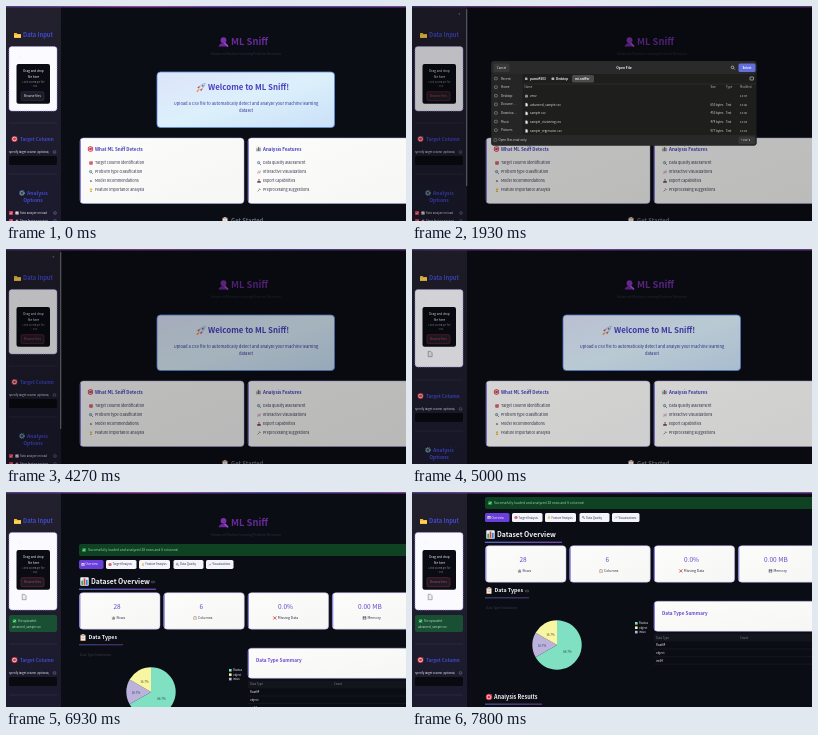
Write an HTML page that moves like this. It is 400 px wide and 215 px high and loops after 8000 ms.

```html
<!DOCTYPE html>
<html lang="en">
<head>
<meta charset="utf-8">
<title>ML Sniff</title>
<style>
  html, body { margin: 0; width: 100%; height: 100%; overflow: hidden; background: #0b0d14; }
  svg { display: block; width: 400px; height: 215px; }
  text { font-family: "Noto Sans CJK SC", "Noto Sans CJK JP", "Noto Sans", sans-serif; white-space: pre; }
</style>
</head>
<body>
<svg id="stage" viewBox="0 0 400 215"></svg>
<script>
const LOOP = 8000, STEP = 1000 / 15;
const BLUE = '#4149cc', VIOLET = '#6848cf', WHITE = '#f3f3f8', INK = '#30304a';

// --- drawing helpers (y of a text is its middle) ---
const rect = (x, y, w, h, fill, r = 0, extra = '') =>
  `<rect x="${x}" y="${y}" width="${w}" height="${h}" rx="${r}" fill="${fill}" ${extra}/>`;
const text = (x, y, size, str, fill = WHITE, weight = 400, anchor = 'start') =>
  `<text x="${x}" y="${y + size * 0.36}" font-size="${size}" fill="${fill}" font-weight="${weight}" text-anchor="${anchor}">${str}</text>`;
const mid = (x, y, size, str, fill, weight) => text(x, y, size, str, fill, weight, 'middle');
const line = (x1, y1, x2, y2, stroke, w = 0.5) =>
  `<path d="M${x1} ${y1}L${x2} ${y2}" stroke="${stroke}" stroke-width="${w}"/>`;
const group = (id, body) => `<g id="${id}">${body}</g>`;
const path = (d, stroke, w = 1.2, fill = 'none') =>
  `<path d="${d}" stroke="${stroke}" stroke-width="${w}" fill="${fill}"/>`;
const disc = (r, fill, x = 5, y = 5) => `<circle cx="${x}" cy="${y}" r="${r}" fill="${fill}"/>`;

// Icons live in a 10 by 10 box
const icons = {
  target: disc(5, '#d92f3c') + disc(3.6, '#f5e6e8') + disc(2.4, '#d92f3c') + path('M5 5L9 1', '#4a7fd0'),
  folder: path('M0 2h4l1 1.5h5V9H0z', 'none', 0, '#f2b92c') + rect(0, 4.5, 10, 4.5, '#ffd257', 0.8),
  chart: rect(0, 0, 10, 10, '#e9edf2', 1) + rect(1.3, 4, 2, 5, '#39a757') + rect(4, 1.5, 2, 7.5, '#d64545') + rect(6.7, 3, 2, 6, '#3e7fd1'),
  trend: rect(0, 0, 10, 10, '#e9edf2', 1) + path('M1 8L4 5L6 6.5L9 2', '#d63b48', 1.4),
  clip: rect(1, 1, 8, 9, '#b9794a', 1) + rect(2, 2.4, 6, 6.8, '#f2f2f2') + rect(3, 0, 4, 2.4, '#a9b3bd', 0.6) + path('M3 4.5h4M3 6.5h4', '#8892a0', 0.7),
  lens: path('M6 6L9.5 9.5', '#3a4656', 1.8) + '<circle cx="4" cy="4" r="3" fill="#a9d4ee" stroke="#4b5b70" stroke-width="1.3"/>',
  check: rect(0, 0, 10, 10, '#27a845', 1.5) + path('M2 5.2L4.3 7.6L8.3 2.5', '#fff', 1.6),
  cross: path('M1 1L9 9M9 1L1 9', '#d9303f', 2.2),
  disk: rect(0.5, 0.5, 9, 9, '#3d4858', 1) + rect(2.5, 0.5, 5, 3.5, '#c9d0d8') + rect(2, 5.5, 6, 4, '#e6e9ee'),
  gear: '<circle cx="5" cy="5" r="4" fill="none" stroke="#6f9fb4" stroke-width="2" stroke-dasharray="1.6 1"/><circle cx="5" cy="5" r="2.6" fill="none" stroke="#6f9fb4" stroke-width="1.5"/>',
  rocket: path('M9.5 .5Q5 .8 2.5 6L4 7.5Q9.2 5 9.5 .5z', '#8590a0', 0.5, '#dfe5ec') + path('M4 3L1 5l1.6.8zM7 6L5 9l-.8-1.6z', 'none', 0, '#d7384a') + disc(1, '#4480ca', 6.8, 3.2) + path('M2.6 7.4L.6 9.4', '#f39c2c', 1.6),
  person: disc(2.9, '#7b2fa8', 5, 3.2) + path('M0 9.5Q1 6 5 6T10 9.5z', 'none', 0, '#6b2697') + path('M6 6L9.5 9.5', '#a64fd0', 1.3),
  star: path('M2 1h6v3Q8 6.5 5 6.5T2 4z', 'none', 0, '#f0c03a') + rect(4.3, 6, 1.4, 2.5, '#d9a021') + rect(2.8, 8.3, 4.4, 1.5, '#b37b1f'),
  tray: rect(0.5, 5, 9, 4.5, '#4c5562', 1) + path('M5 7V1M2.6 3L5 .8L7.4 3', '#d43d4b', 1.6),
  tool: path('M1.5 8.5L7 3', '#8d5c34', 1.8) + path('M5.5 1L9 4.5', '#7d8896', 2.2),
  dot: path('M5 2L6 4.4L8.5 5L6 6L5 8.4L4 6L1.5 5L4 4z', 'none', 0, '#46506a'),
  file: path('M2 .5h4L8.5 3v6.5H2z', '#707080', 0.9, '#ececf2'),
  link: path('M4.5 3H2.5a2 2 0 000 4h2M5.5 3h2a2 2 0 010 4h-2M3.5 5h3', '#8a8c98', 1),
};
const icon = (name, x, y, s) =>
  `<g transform="translate(${x - s / 2} ${y - s / 2}) scale(${s / 10})">${icons[name]}</g>`;
const help = (x, y) => `<circle cx="${x}" cy="${y}" r="1.4" fill="none" stroke="#9a9aac" stroke-width=".4"/>` + mid(x, y, 2, '?', '#9a9aac');

const card = (x, y, w, h) =>
  rect(x, y, w, h, 'url(#paper)', 3.5, 'stroke="#b4abee" stroke-width=".5"') +
  rect(x, y + 2, 0.9, h - 4, '#7d72e2', 0.4);

// --- sidebar ---
function sidebar() {
  const drop = rect(3, 40.5, 48, 64.5, '#fafaff', 3, 'id="drop" stroke="#a99fec" stroke-width=".8" stroke-dasharray="1.2 .9"') +
    text(13, 50, 2.4, '▯', '#d5d5de') +
    rect(10.5, 58, 33.5, 39.8, '#0b0c13', 2) +
    mid(27.5, 65, 3.1, 'Drag and drop', WHITE, 500) + mid(27.5, 71, 3.1, 'file here', WHITE, 500) +
    mid(27.5, 76, 2.4, 'Limit 200MB per file', '#8e8f9b') + mid(27.5, 80, 2.4, '• CSV', '#8e8f9b') +
    rect(15, 85.7, 23, 9, '#1b1c28', 1.5, 'id="browse" stroke="#42434f" stroke-width=".4"') +
    group('browseText', mid(26.5, 90.2, 3, 'Browse files', 'currentColor', 500)) +
    group('chip', icon('file', 18, 105, 6));
  const uploaded = rect(3, 123, 48, 17, '#194f33', 2) + icon('check', 8.5, 129, 3.6) +
    text(12, 129, 2.8, 'File uploaded:', '#b9efc9') + text(6, 134.5, 2.8, 'advanced_sample.csv', '#b9efc9');
  const option = (y, name, str) => rect(3, y - 2, 4, 4, '#e23b52', 0.8) + path(`M4 ${y}l.8 .9l1.4 -1.8`, '#fff', 0.5) +
    icon(name, 11, y, 3.2) + text(14, y, 2.8, str) + help(49, y);
  const lower = line(3, 117, 51, 117, '#34344a') +
    icon('target', 8.5, 133, 6) + text(14, 133, 4.7, 'Target Column', BLUE, 700) +
    text(3, 146, 2.7, 'Specify target column (optional)') + help(48.5, 146) +
    rect(3, 150, 48, 9, '#080a10', 1.5) + line(3, 168, 51, 168, '#34344a') +
    icon('gear', 16, 187, 5.6) + text(21, 187, 5.1, 'Analysis', BLUE, 700) + mid(27, 194, 5.1, 'Options', BLUE, 700) +
    option(207, 'trend', 'Auto analyze on load') + option(215, 'target', 'Show feature analysis');
  return rect(0, 0, 55, 215, 'url(#side)') +
    group('hovered', mid(47.5, 7.5, 4, '«', '#c0c0cc') + rect(54, 3, 1.3, 177, '#6b6b76', 0.6)) +
    icon('folder', 11.5, 29, 7) + text(17, 29, 5.8, 'Data Input', BLUE, 700) +
    drop + group('uploaded', uploaded) + group('lower', lower);
}

const header = y => icon('person', 217.5, y, 10) + text(225, y, 9.4, 'ML Sniff', '#672b99', 700) +
  mid(240, y + 12, 3.2, 'Advanced Machine Learning Problem Detection', '#2f313d');

function welcome() {
  const features = (x, name, title, items) => card(x, 132, 164, 65.5) +
    icon(name, x + 10.5, 143, 5.4) + text(x + 15, 143, 4.5, title, '#4540b8', 700) +
    items.map(([n, s], i) => icon(n, x + 11, 157 + i * 9, 4) + text(x + 15, 157 + i * 9, 3.75, s, INK)).join('');
  return header(36) +
    rect(151, 66, 177.5, 55.5, 'url(#sky)', 3.5, 'stroke="#5f8ee8" stroke-width=".8"') +
    icon('rocket', 195, 81.5, 9.5) + text(202, 81.5, 7.9, 'Welcome to ML Sniff!', '#493fc0', 700) +
    mid(240, 97.5, 4.1, 'Upload a CSV file to automatically detect and analyze your machine learning', '#34309a', 500) +
    mid(240, 104.5, 4.1, 'dataset', '#34309a', 500) +
    features(74, 'target', 'What ML Sniff Detects', [['target', 'Target column identification'], ['lens', 'Problem type classification'],
      ['dot', 'Model recommendations'], ['star', 'Feature importance analysis']]) +
    features(242, 'chart', 'Analysis Features', [['lens', 'Data quality assessment'], ['trend', 'Interactive visualizations'],
      ['tray', 'Export capabilities'], ['tool', 'Preprocessing suggestions']]) +
    icon('clip', 219, 214.5, 7) + text(225, 214.5, 5.8, 'Get Started', '#6c6e7a', 700);
}

// --- results page ---
function slice(from, to, fill) {
  const r = 24.7, p = a => `${145 + r * Math.sin(a * 2 * Math.PI)} ${206 - r * Math.cos(a * 2 * Math.PI)}`;
  return `<path d="M145 206L${p(from)}A${r} ${r} 0 ${to - from > 0.5 ? 1 : 0} 1 ${p(to)}z" fill="${fill}"/>`;
}
function results() {
  const tabs = [[73, 24.5, 'chart', 'Overview'], [100, 30.5, 'target', 'Target Analysis'], [133, 31, 'star', 'Feature Analysis'],
    [167.5, 30, 'lens', 'Data Quality'], [200, 27.5, 'trend', 'Visualizations']];
  const stats = [['28', 'chart', 'Rows'], ['6', 'clip', 'Columns'], ['0.0%', 'cross', 'Missing Data'], ['0.00 MB', 'disk', 'Memory']];
  const kinds = [['float64', '#80e0c2'], ['object', '#f8f6a2'], ['int64', '#bbb3dc']];
  const chart = text(74, 169, 3, 'Data Type Distribution', '#3b3d48') +
    slice(0, 2 / 3, kinds[0][1]) + slice(2 / 3, 5 / 6, kinds[2][1]) + slice(5 / 6, 1, kinds[1][1]) +
    mid(155.5, 212.5, 3, '66.7%', '#26443c') + mid(130, 206.5, 3, '16.7%', '#3b3650') + mid(138.5, 195.5, 3, '16.7%', '#4b4a28') +
    kinds.map(([k, c], i) => rect(223, 183 + i * 4.4, 2.6, 2.6, c) + text(227, 184.3 + i * 4.4, 2.8, k)).join('') +
    rect(242, 194.5, 158, 8, '#12151c', 1) + text(244, 198.5, 2.8, 'Data Type', '#85878f') + text(328, 198.5, 2.8, 'Count', '#85878f') +
    kinds.map(([k], i) => text(244, 206.3 + i * 7.6, 2.9, k) + line(242, 210 + i * 7.6, 400, 210 + i * 7.6, '#242731', 0.4)).join('');
  return header(36.7) +
    rect(73, 58, 335, 12, '#0f4123', 2) + icon('check', 78, 64, 3.6) +
    text(82, 64, 3.4, 'Successfully loaded and analyzed 28 rows and 6 columns!', '#8fdca8') +
    tabs.map(([x, w, n, s], i) => rect(x, 74, w, 9, i ? '#f4f4fb' : '#6a3fdc', 1.6) +
      icon(n, x + 4, 78.5, 3) + text(x + 6.5, 78.5, 2.8, s, i ? INK : '#fff', 500)).join('') +
    icon('chart', 78.5, 95.5, 8.5) + text(85, 95.5, 6.8, 'Dataset Overview', WHITE, 700) +
    rect(73, 102.7, 77, 1.1, 'url(#bar)') +
    stats.map(([v, n, s], i) => {
      const x = 73.5 + i * 84.3, c = x + 37.5, half = s.length * 0.9;
      return card(x, 106.7, 80.5, 36.5) + mid(c, 121, 6.5, v, VIOLET, 500) +
        icon(n, c - half, 132, 3.8) + text(c - half + 3, 132, 3.5, s, INK);
    }).join('') +
    icon('clip', 77, 151.5, 7) + text(82.5, 151.5, 5.3, 'Data Types', WHITE, 700) + rect(73, 158.6, 44, 0.6, 'url(#bar)') +
    group('linkA', icon('link', 147, 96, 4)) + group('linkB', icon('link', 115, 152, 4)) +
    card(242, 162.3, 166, 30) + text(250, 174.5, 4.6, 'Data Type Summary', VIOLET, 700) +
    group('skeleton', rect(74, 160, 164.5, 9, '#1a1c25', 1.5) + rect(242, 195, 166, 9, '#1a1c25', 1.5)) +
    group('chart', chart) +
    group('analysis', icon('target', 77, 214, 6.5) + text(82, 214, 5.5, 'Analysis Results', WHITE, 700) +
      rect(73, 220.7, 57, 0.8, 'url(#bar)'));
}

// --- file dialog ---
function dialog() {
  const places = ['Recent', 'Home', 'Desktop', 'Docume…', 'Downloa…', 'Music', 'Pictures'];
  const files = [['venv', '', '', '13:47'], ['advanced_sample.csv', '653 bytes', 'Text', '13:46'], ['sample.csv', '453 bytes', 'Text', '13:40'],
    ['sample_clustering.csv', '474 bytes', 'Text', '13:03'], ['sample_regression.csv', '977 bytes', 'Text', '13:03']];
  const grey = '#b9b9b9', row = (y, a, b, c, d, f) => text(118, y, 3, a, f) + text(298.5, y, 2.9, b, f) +
    text(314, y, 2.8, c, f) + text(328, y, 2.8, d, f);
  return rect(79.3, 55, 265.2, 84.5, '#1e1e1d', 3) +
    rect(79.3, 55, 265.2, 13, '#2a2a2a', 3) +
    rect(81.5, 57.5, 16, 8.5, '#383838', 1.5) + mid(89.5, 61.8, 3, 'Cancel', WHITE, 500) +
    mid(212, 61.8, 3.3, 'Open File', WHITE, 700) +
    '<circle cx="320.5" cy="61.3" r="1.3" fill="none" stroke="#ddd" stroke-width=".6"/>' + line(321.4, 62.2, 322.8, 63.6, '#ddd', 0.6) +
    rect(326.5, 57.5, 17, 8.5, '#6170dc', 1.5, 'id="select"') + mid(335, 61.8, 3, 'Select', '#fff', 700) +
    rect(79.3, 68, 31.2, 61, '#252525') +
    places.map((s, i) => rect(82.5, 71.3 + i * 8.6, 2.8, 2.5, 'none', 0.5, 'stroke="#aaa" stroke-width=".5"') + text(89, 72.5 + i * 8.6, 3, s, '#d8d8d8')).join('') +
    rect(160, 69, 22, 7.5, '#4a4a4a', 1.5) + rect(113, 71.5, 2.5, 2.5, '#b0b0b0', 0.5) +
    text(118, 72.5, 3, 'parnil4103', WHITE, 700) + rect(139.5, 71.5, 2.8, 2.5, '#b0b0b0', 0.4) +
    text(144, 72.5, 3, 'Desktop', WHITE, 700) + text(163, 72.5, 3, 'ml-sniffer', WHITE, 700) +
    rect(338, 71, 3.5, 3, 'none', 0.4, 'stroke="#ddd" stroke-width=".6"') +
    line(110.5, 78, 344, 78, '#343434') + row(81.2, '', 'Size', 'Type', 'Modified', grey) + text(112.5, 81.2, 2.8, 'Name', grey) +
    rect(111, 86, 233, 8.4, '#363636', 0, 'id="hover"') +
    files.map((f, i) => (i ? icon('file', 114.5, 90 + i * 8.7, 3.6) : rect(113, 88.8, 3, 2.6, '#8f8f94', 0.4)) +
      row(90 + i * 8.7, ...f, '#dedede')).join('') +
    rect(79.3, 129, 265.2, 10.5, '#282828', 2) + rect(82, 132.6, 2.8, 2.8, 'none', 0.6, 'stroke="#999" stroke-width=".5"') +
    text(86.5, 134, 3, 'Open files read-only', '#d8d8d8') +
    rect(326.5, 130.5, 16.5, 7.5, '#383838', 1.5) + text(329, 134.2, 2.9, '*.csv  ▾');
}

const fade = (id, axis, stops) => `<linearGradient id="${id}" ${axis}>` +
  stops.map((c, i) => `<stop offset="${i / (stops.length - 1)}" stop-color="${c}"/>`).join('') + '</linearGradient>';
const down = 'x1="0" y1="0" x2="0" y2="1"', slant = 'x1="0" y1="0" x2="1" y2="1"';
const stage = document.getElementById('stage');
stage.innerHTML = '<defs>' + fade('side', down, ['#22202c', '#1b1a2e']) + fade('paper', slant, ['#fcfcfb', '#f6f6f5']) +
  fade('sky', slant, ['#dde4fa', '#dcf0fb', '#c9e0f7']) + fade('bar', '', ['#667eea', '#8e4fc9']) +
  fade('strip', '', ['#4d3d86', '#93499f', '#5a4ba6', '#7b4798']) + '</defs>' +
  rect(0, 0, 400, 215, '#0b0d14') + group('welcome', welcome()) + group('results', results()) + sidebar() +
  rect(0, 0, 400, 1.4, 'url(#strip)') + rect(0, 0, 400, 215, '#000', 0, 'id="dim"') + group('dialog', dialog());

// --- motion ---
const el = {};
stage.querySelectorAll('[id]').forEach(e => el[e.id] = e);
const set = (id, name, value) => el[id].setAttribute(name, value);
const show = (id, on) => set(id, 'opacity', +on);
const shift = (id, y) => set(id, 'transform', `translate(0 ${y})`);

// Piecewise linear value through [time, value] points
function at(t, ...points) {
  for (let i = 1; i < points.length; i++) {
    const [t0, a] = points[i - 1], [t1, b] = points[i];
    if (t < t1) return a + (b - a) * Math.max(0, (t - t0) / (t1 - t0));
  }
  return points[points.length - 1][1];
}
const mix = (a, b, k) => `rgb(${a.map((v, i) => Math.round(v + (b[i] - v) * k))})`;

function draw(t) {
  const opened = t > 1700, loaded = t >= 5330, charted = t >= 6060;
  const hot = opened ? 0 : at(t, [70, 0], [470, 1]);
  set('browse', 'fill', mix([27, 28, 40], [224, 70, 92], hot));
  set('browse', 'stroke', opened ? '#b5303f' : '#42434f');
  el.browseText.style.color = opened ? '#d8394a' : mix([243, 243, 248], [255, 140, 152], hot);
  show('hovered', t >= 130 && t < 4270);

  const hasFile = t >= 4330;
  set('drop', 'height', hasFile ? 77.5 : 64.5);
  show('chip', hasFile);
  show('uploaded', loaded);
  shift('lower', loaded ? 35 : hasFile ? 14 : 0);

  set('dim', 'opacity', at(t, [1400, 0], [2000, 0.27], [4200, 0.27], [4600, 0.16], [5070, 0.16], [5400, 0]));
  const open = at(t, [1470, 0], [1800, 1], [3930, 1], [4130, 0]), size = 0.94 + 0.06 * open;
  set('dialog', 'opacity', open);
  set('dialog', 'transform', `translate(211.5 97) scale(${size}) translate(-211.5 -97)`);
  const row = t < 2800 ? 4 : t < 3130 ? 3 : t < 3200 ? 2 : 1;
  show('hover', t >= 2260);
  set('hover', 'y', 85.8 + row * 8.7);
  set('hover', 'fill', t >= 3320 ? '#3f4a86' : '#363636');
  set('select', 'fill', t >= 3590 ? '#7683ea' : '#6170dc');

  show('welcome', !loaded);
  set('results', 'opacity', loaded ? at(t, [5330, 0.35], [5730, 1]) : 0);
  shift('results', -at(t, [6867, 0], [6933, 6], [7067, 18], [7200, 18], [7533, 53]));
  show('skeleton', !charted);
  show('chart', charted);
  shift('analysis', charted ? 44 : 0);
  show('linkA', t < 7500);
  show('linkB', t >= 7500);
}

const start = performance.now();
function tick() {
  const t = (performance.now() - start) % LOOP;
  draw(Math.floor((t + 5) / STEP) * STEP % LOOP);
  requestAnimationFrame(tick);
}
tick();
</script>
</body>
</html>
```
